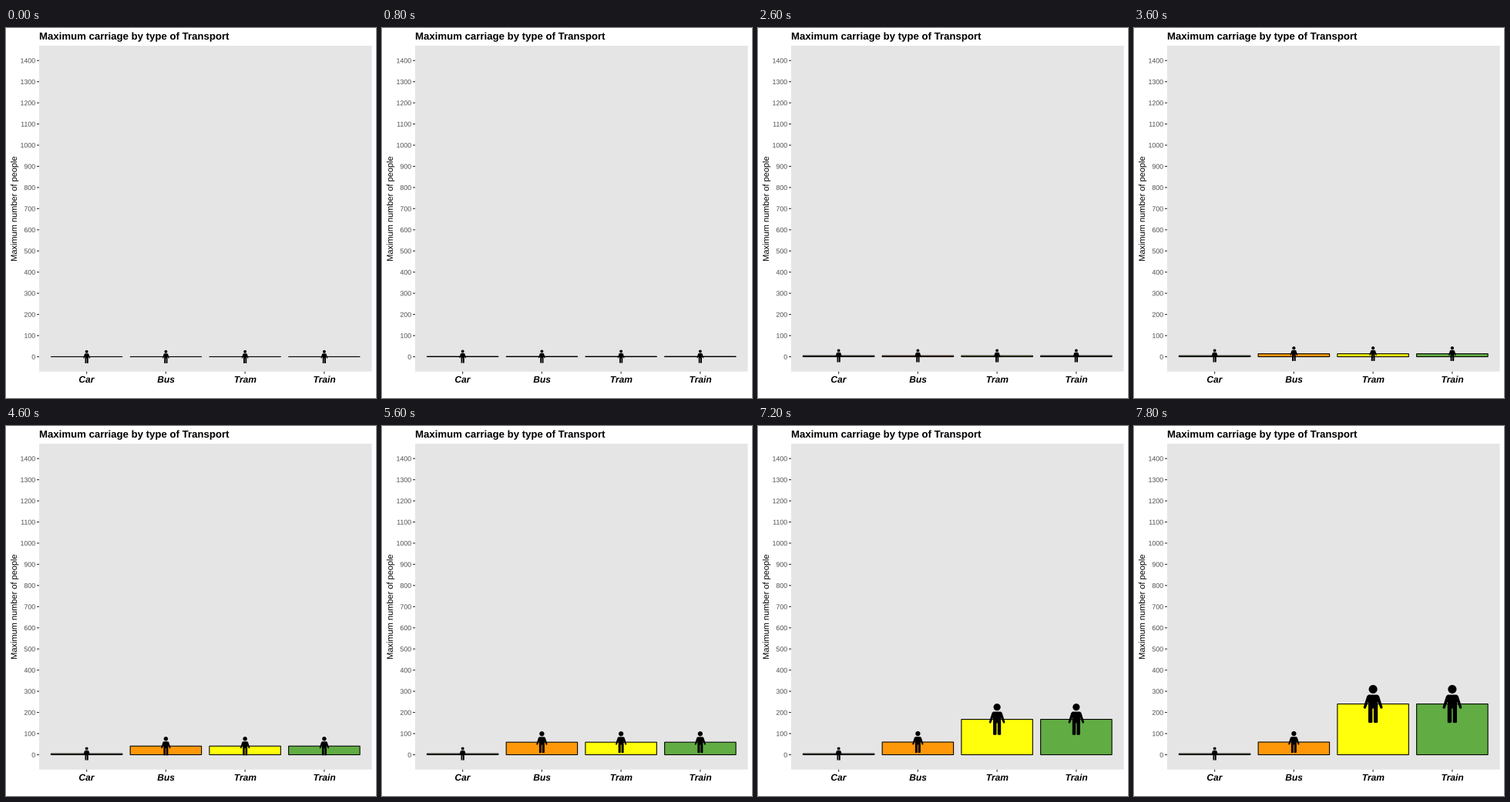
These frames come from a looping animation (480x480 px, 8000 ms). A matplotlib script:

```python
import math

import matplotlib.pyplot as plt
import numpy as np
from matplotlib.animation import FuncAnimation
from matplotlib.patches import Circle, PathPatch, Polygon, Rectangle
from matplotlib.textpath import TextPath
from matplotlib.transforms import Affine2D

SIZE, DPI = 480, 100
FRAMES, INTERVAL = 40, 200
LINE = 1.07 * 72 / DPI              # stroke width in points

LEFT, RIGHT, TOP, BOTTOM = 43, 474.5, 23, 445.7
UNIT = (RIGHT - LEFT) / 4.2         # width of one category slot
SCALE = (BOTTOM - TOP) / 1.1 / 1400
ZERO = BOTTOM - 70 * SCALE

NAMES = ["Car", "Bus", "Tram", "Train"]
FILLS = ["#62ac44", "#ff9808", "#ffff0c", "#62ac44"]

# Each stage lasts STEP frames; a bar stops growing at its own stage.
STEP = 15
LEVELS = [0, 5, 60, 300]
HEIGHTS = [17, 17, 28, 56]

HALF_BODY = [(0, -.245), (.12, -.245), (.16, -.21), (.255, .09), (.235, .125),
             (.195, .12), (.125, -.06), (.125, .48), (.105, .5), (.035, .5),
             (.016, .48), (.016, .12), (0, .12)]
BODY = np.array(HALF_BODY + [(-x, y) for x, y in HALF_BODY[::-1]])

fig = plt.figure(figsize=(SIZE / DPI, SIZE / DPI), dpi=DPI, facecolor="white")
ax = fig.add_axes([0, 0, 1, 1])
ax.set_xlim(0, SIZE)
ax.set_ylim(SIZE, 0)
ax.axis("off")


def label(x, y, text, px, color="black", align=0.0, angle=0, **style):
    """Draw text as outlines; align is 0 for left, 0.5 centre, 1 right."""
    prop = {"family": "Liberation Sans", **style}
    path = TextPath((0, 0), text, size=px, prop=prop)
    shift = -align * path.get_extents().x1
    move = Affine2D().translate(shift, 0).scale(1, -1)
    move.rotate_deg(angle).translate(x, y)
    ax.add_patch(PathPatch(move.transform_path(path), fc=color, lw=0))


def tick(xs, ys):
    ax.plot(xs, ys, color="#333333", lw=LINE, solid_capstyle="butt",
            snap=False)


class Column:
    """A bar with a person standing at its top edge."""

    def __init__(self, index):
        self.last = min(index + 1, 3)
        self.x = LEFT + UNIT * (0.6 + index)
        self.bar = Rectangle((self.x - .45 * UNIT, ZERO), .9 * UNIT, 0,
                             fc=FILLS[index], ec="black", lw=LINE,
                             joinstyle="miter", snap=False, zorder=3)
        self.head = Circle((self.x, ZERO), 1, color="black", lw=0, zorder=4)
        self.body = Polygon(BODY, color="black", lw=0, zorder=4)
        for part in (self.bar, self.head, self.body):
            ax.add_patch(part)

    def update(self, stage, ease):
        a, b = min(stage, self.last), min(stage + 1, self.last)
        value = LEVELS[a] + (LEVELS[b] - LEVELS[a]) * ease
        h = HEIGHTS[a] + (HEIGHTS[b] - HEIGHTS[a]) * ease
        y = ZERO - value * SCALE
        self.bar.set_height(y - ZERO)
        self.head.center = (self.x, y - .39 * h)
        self.head.set_radius(.113 * h)
        self.body.set_xy(BODY * h + (self.x, y))
        return [self.bar, self.head, self.body]


ax.add_patch(Rectangle((LEFT, TOP), RIGHT - LEFT, BOTTOM - TOP,
                       fc="#e5e5e5", lw=0, snap=False))
label(LEFT, 15, "Maximum carriage by type of Transport", 13.2, weight="bold")
label(14, (TOP + BOTTOM) / 2 + .5, "Maximum number of people", 11,
      align=.5, angle=-90)

for n in range(0, 1401, 100):
    y = ZERO - n * SCALE
    tick([LEFT - 3, LEFT], [y, y])
    label(LEFT - 5.2, y + 3.2, str(n), 8.8, "#4d4d4d", align=1)

columns = [Column(i) for i in range(4)]
for name, col in zip(NAMES, columns):
    tick([col.x, col.x], [BOTTOM, BOTTOM + 3])
    label(col.x, 460, name, 12, align=.5, weight="bold", style="italic")


def draw(frame):
    stage, step = divmod(frame + 1, STEP)
    ease = (1 - math.cos(math.pi * step / STEP)) / 2
    return [p for col in columns for p in col.update(stage, ease)]


anim = FuncAnimation(fig, draw, frames=FRAMES, interval=INTERVAL,
                     init_func=lambda: draw(0), repeat=True, repeat_delay=0)
plt.show()
```
